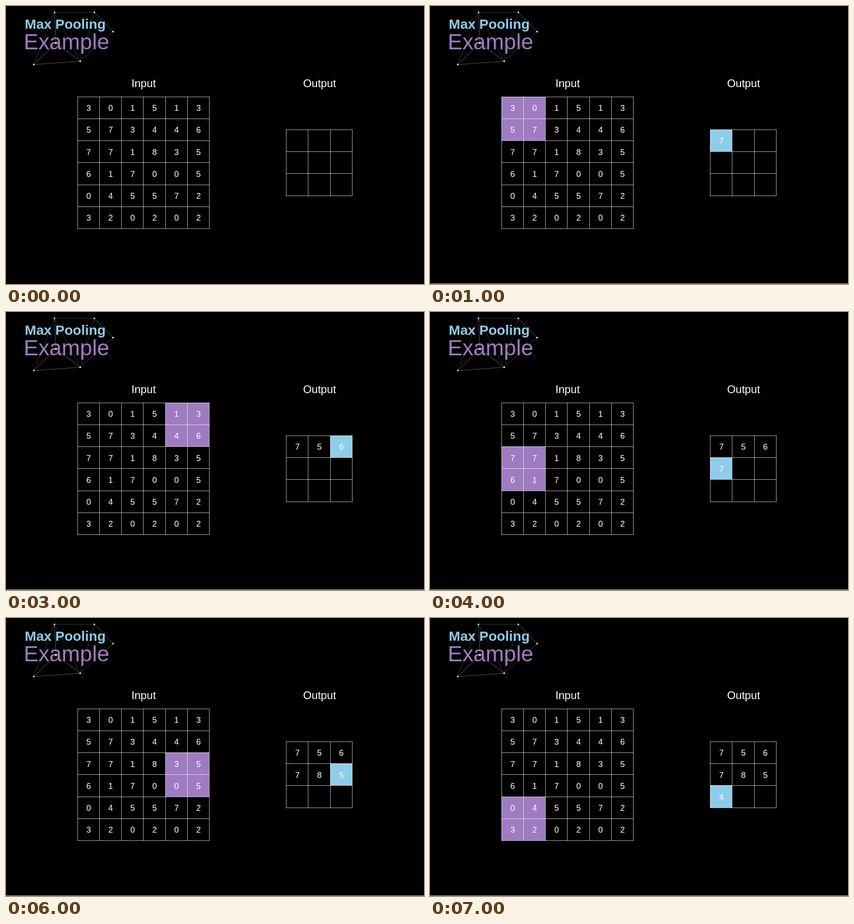
Write an HTML page with a canvas that moves like this. It is 918x610 px and loops after 8000 ms.

```html
<!DOCTYPE html>
<html lang="en">
<head>
<meta charset="utf-8">
<title>Max Pooling Example</title>
<style>
  html, body { margin: 0; width: 100%; height: 100%; overflow: hidden; background: #000; }
  canvas { display: block; }
</style>
</head>
<body>
<canvas id="stage" width="918" height="610"></canvas>
<script>
const ctx = document.getElementById('stage').getContext('2d');
const LOOP = 8000, STEP = 1000;
const CELL_W = 48.25, CELL_H = 48.2;
const PURPLE = '#9f7cc1', BLUE = '#8ecdea';

const input = ['301513', '573446', '771835', '617005', '045572', '320202'];
const inputGrid = { x: 157.1, y: 199.25, n: 6 };
const outputGrid = { x: 615.7, y: 271.55, n: 3 };

const nodes = [[106.5, 14], [194, 14], [235, 56.3], [163, 121.3], [61, 128.5], [109.5, 81.5]];
const edges = [
  [0, 1, '#3c3c3c'], [1, 2, '#666'], [2, 3, '#484848'], [3, 4, '#5c5c5c'], [4, 5, '#666'],
  [5, 3, '#666'], [0, 5, '#5c5c5c'], [0, 3, '#3c3c3c'], [0, 4, '#3c3c3c'], [1, 3, '#3c3c3c']
];

const lineX = (grid, i) => Math.floor(grid.x + i * CELL_W);
const lineY = (grid, i) => Math.floor(grid.y + i * CELL_H);

function text(str, x, y, size, color = '#fff', align = 'center', weight = 'normal') {
  ctx.font = `${weight} ${size}px "Liberation Sans", Arial, sans-serif`;
  ctx.textAlign = align;
  ctx.fillStyle = color;
  ctx.fillText(str, x, y);
}

function digit(grid, col, row, value) {
  text(value, grid.x + (col + 0.5) * CELL_W + 0.2, grid.y + (row + 0.5) * CELL_H + 6.8, 18.1);
}

function highlight(grid, col, row, span, color) {
  const x = lineX(grid, col), y = lineY(grid, row);
  ctx.fillStyle = color;
  ctx.fillRect(x, y, lineX(grid, col + span) - x, lineY(grid, row + span) - y);
}

function drawGrid(grid) {
  const { n } = grid;
  ctx.strokeStyle = 'rgba(255,255,255,.74)';
  ctx.lineWidth = 1;
  ctx.beginPath();
  for (let i = 0; i <= n; i++) {
    const x = lineX(grid, i) + 0.5, y = lineY(grid, i) + 0.5;
    ctx.moveTo(x, lineY(grid, 0));
    ctx.lineTo(x, lineY(grid, n) + 1);
    ctx.moveTo(lineX(grid, 0), y);
    ctx.lineTo(lineX(grid, n) + 1, y);
  }
  ctx.stroke();
}

function drawTitle() {
  ctx.lineWidth = 1;
  for (const [a, b, color] of edges) {
    ctx.strokeStyle = color;
    ctx.beginPath();
    ctx.moveTo(...nodes[a]);
    ctx.lineTo(...nodes[b]);
    ctx.stroke();
  }
  text('Max Pooling', 41.3, 50.3, 30.15, BLUE, 'left', 'bold');
  text('Example', 39, 95.3, 48.25, PURPLE, 'left');
  ctx.fillStyle = '#fff';
  for (const [x, y] of nodes) {
    ctx.beginPath();
    ctx.arc(x, y, 1.7, 0, 2 * Math.PI);
    ctx.fill();
  }
}

function poolMax(col, row) {
  const cells = input.slice(2 * row, 2 * row + 2).map(line => line.slice(2 * col, 2 * col + 2));
  return Math.max(...cells.join(''));
}

function draw(time) {
  const step = Math.floor((time % LOOP) / STEP);
  ctx.fillStyle = '#000';
  ctx.fillRect(0, 0, 918, 610);
  drawTitle();
  text('Input', 302.3, 178, 24.1);
  text('Output', 688.7, 178, 24.1);

  if (step) {
    const col = (step - 1) % 3, row = Math.floor((step - 1) / 3);
    highlight(inputGrid, 2 * col, 2 * row, 2, PURPLE);
    highlight(outputGrid, col, row, 1, BLUE);
    ctx.fillStyle = '#d8d8d8';
    ctx.fillRect(0, 609, 918, 1);
  }
  drawGrid(inputGrid);
  drawGrid(outputGrid);

  input.forEach((line, row) => [...line].forEach((value, col) => digit(inputGrid, col, row, value)));
  for (let i = 0; i < step; i++) {
    const col = i % 3, row = Math.floor(i / 3);
    digit(outputGrid, col, row, poolMax(col, row));
  }
}

const start = performance.now();
function tick() {
  draw(performance.now() - start);
  requestAnimationFrame(tick);
}
tick();
</script>
</body>
</html>
```
